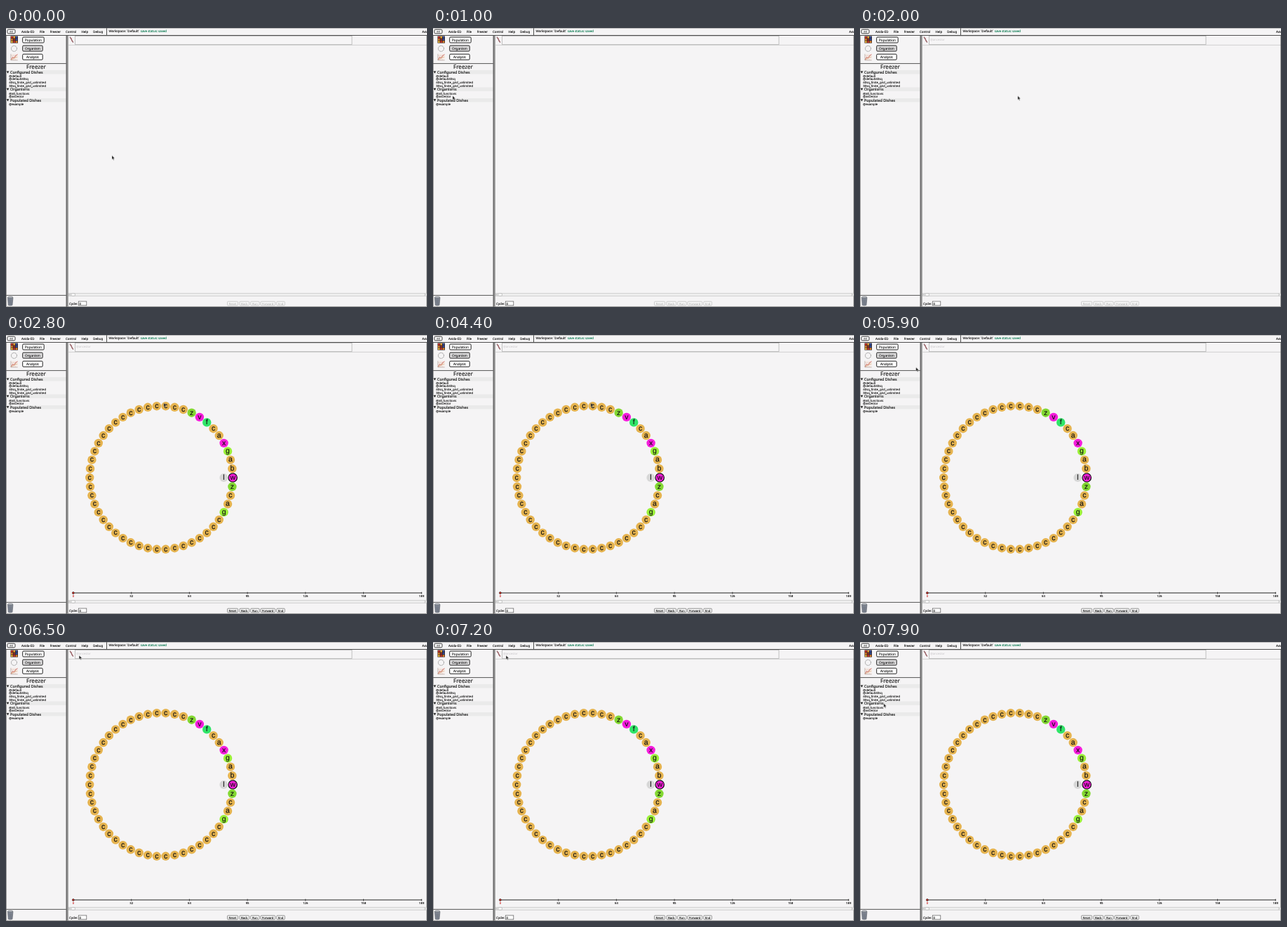
Animation, 600 px wide and 397 px high, one loop 8 s. Source, as an HTML page:

```html
<!DOCTYPE html>
<html lang="en">
<head>
<meta charset="utf-8">
<title>Organism view</title>
<style>
  html, body { margin: 0; width: 100%; height: 100%; overflow: hidden; background: #f5f4f5; }
  svg { display: block; width: 600px; height: 397px; }
  text {
    font-family: "Noto Sans", sans-serif; font-size: 4.4px; fill: #111; stroke: #111;
    stroke-width: .12px; text-rendering: geometricPrecision;
  }
  .gene { font: 10.5px "Liberation Sans", sans-serif; }
  .status { fill: #087a50; stroke: #087a50; }
  .faint { fill: #c6c4c7; stroke: none; }
  .disabled { fill: #aaa; stroke: none; }
  .current { fill: #c22; stroke: #c22; }
  #cursor { animation: travel 8s linear infinite; }
  #loaded { animation: load 8s step-end infinite; }
  #field { animation: drop 8s step-end infinite; }
  #idle { animation: unload 8s step-end infinite; }
  #picked { animation: pick 8s step-end infinite; }
  @keyframes travel {
    0%, 1.25% { transform: translate(151px, 181.5px); }
    5% { transform: translate(103px, 146px); }
    9% { transform: translate(48px, 108px); }
    11.25%, 18.75% { transform: translate(28px, 96.5px); }
    21% { transform: translate(125px, 96px); }
    23.75%, 56.25% { transform: translate(224.8px, 96.6px); }
    61% { transform: translate(136px, 91px); }
    65%, 67.5% { transform: translate(46.7px, 85.3px); }
    73% { transform: translate(76px, 50px); }
    78.75%, 90% { transform: translate(104.2px, 19px); }
    95% { transform: translate(66px, 56px); }
    98.75%, 100% { transform: translate(33.8px, 87.5px); }
  }
  @keyframes load { 0% { visibility: hidden; } 35%, 100% { visibility: visible; } }
  @keyframes unload { 0% { visibility: visible; } 35%, 100% { visibility: hidden; } }
  @keyframes drop { 0% { visibility: hidden; } 25%, 100% { visibility: visible; } }
  @keyframes pick {
    0% { fill: #111; stroke: #111; }
    65% { fill: #aaa; stroke: #aaa; }
    70%, 100% { fill: #111; stroke: #111; }
  }
</style>
</head>
<body>
<svg id="stage" viewBox="0 0 600 397"></svg>
<script>
const parts = [];
const add = markup => parts.push(markup);
const rect = (x, y, w, h, fill, extra = '') =>
  add(`<rect x="${x}" y="${y}" width="${w}" height="${h}" fill="${fill}" ${extra}/>`);
const circle = (x, y, r, fill, extra = '') =>
  add(`<circle cx="${x}" cy="${y}" r="${r}" fill="${fill}" ${extra}/>`);
const path = (d, stroke, width, fill = 'none') =>
  add(`<path d="${d}" stroke="${stroke}" stroke-width="${width}" fill="${fill}"/>`);
const text = (x, y, label, size = 4.4, extra = '') =>
  add(`<text x="${x}" y="${y}" style="font-size:${size}px" ${extra}>${label}</text>`);
const centred = 'text-anchor="middle"';
const group = (id, draw) => { add(`<g id="${id}">`); draw(); add('</g>'); };

function menuBar() {
  rect(2, 2.2, 11, 5.6, '#fff', 'rx="1.4" stroke="#222" stroke-width=".9"');
  text(7.5, 6.6, '&lt;&lt;', 4.4, centred);
  [[22, 'Avida-ED'], [48, 'File'], [62.8, 'Freezer'], [85, 'Control'],
   [107.6, 'Help'], [124.3, 'Debug'], [593, 'Avida-ED']].forEach(([x, label]) => text(x, 7, label));
  text(146.5, 6.2, 'Workspace: `Default`', 4.5);
  text(191.8, 6.2, 'save status: saved', 4.4, 'class="status"');
  path('M0 10.5H600M143.5 0V10.5', '#505050', 1);
  path('M0 .3H600', '#777', .6);
}

function modeButtons() {
  rect(6.5, 11.5, 10.5, 10, '#33231f');
  ['#c8322a', '#e9a52e', '#2f4c9c', '#e4862b', '#8e2f27', '#2f4c9c', '#e9b83a', '#c8322a', '#e4862b']
    .forEach((color, i) => rect(7.1 + i % 3 * 3.3, 12 + Math.floor(i / 3) * 3.2, 2.6, 2.5, color));
  circle(11.5, 29.3, 4, 'none', 'stroke="#666" stroke-width=".8" stroke-dasharray="1.1 .7"');
  rect(7, 36.8, 9.7, 9, '#f9f1ed');
  path('M7 39.5H16.5M7 42.5H16.5M10 37V46M13 37V46', '#dcc5ba', .5);
  path('M7.3 45.5L9.5 41.5L11.5 43L13.5 39.5L16.5 37.5', '#bd3a34', .7);
  path('M7.3 44.5L10.5 43.8L13 41.5L16.3 41', '#d99b55', .5);
  path('M7 36.8V45.8H16.7', '#8d7770', .5);
  [['Population', 13, 30.5, '#fff'], ['Organism', 25, 28.5, '#dcdbdc'], ['Analysis', 37.2, 28.5, '#fff']]
    .forEach(([label, y, w, fill]) => {
      rect(23.7, y, w, 8, fill, 'rx="1.3" stroke="#222" stroke-width="1"');
      text(23.7 + w / 2, y + 5.7, label, 4.7, centred);
    });
}

function freezer() {
  path('M0 50.6H86M0 380.4H86', '#555', 1);
  path('M.4 10.5V396.6H86', '#666', .7);
  text(43, 58.1, 'Freezer', 8, centred);
  [['Configured Dishes', 62.8], ['Organisms', 87.2], ['Populated Dishes', 102.7]].forEach(([label, y]) => {
    rect(0.8, y - 2.7, 85, 5.4, '#eaeaea');
    path(`M.7 ${y - 1.4}H4.3L2.5 ${y + 1.6}Z`, 'none', 0, '#111');
    text(6, y + 1.9, label, 5.4);
  });
  [['@default', 68.2], ['@default40sq', 72.8], ['40sq_finite_grid_unlimited', 77.5, 'id="picked"'],
   ['30sq_finite_grid_unlimited', 82.2], ['@all_functions', 93], ['@ancestor', 97.6], ['@example', 108.3]]
    .forEach(([label, y, extra]) => text(4.3, y + 1.5, label, 4.28, extra));
  path('M2.5 383.5L3.3 394.3Q6 395.5 9 394.3L10 383.5Z', '#4d525c', .6, '#838996');
  add('<ellipse cx="6.2" cy="383.4" rx="3.8" ry="1.2" fill="#b4b9bf" stroke="#4d525c" stroke-width=".6"/>');
  path('M4.6 386L5 393M6.3 386V393.5M8 386L7.6 393', '#575d69', .4);
}

function workspace() {
  rect(85.7, 10.5, 2.8, 387, '#979797');
  path('M86.2 10.5V397', '#555', 1);
  path('M88.3 10.5V397', '#777', .5);
  path('M88 24.3H600', '#b5b5b5', .6);
  path('M88 396.6H599.6V10.5', '#666', .7);
  rect(98.5, 11.5, 394.5, 12, '#f6f5f6', 'stroke="#aaa" stroke-width=".7"');
  path('M91 12.5L95.8 20.6', '#7d5a5e', 1.1);
  path('M91.2 14.2Q94.3 13.6 93.6 16.6T96 19.6', '#b0555c', .6);
  rect(89.5, 377.8, 510, 3.4, '#f0f0f0', 'stroke="#b5b5b5" stroke-width=".6"');
  path('M91.8 378.5L90.5 379.5L91.8 380.5M596.5 378.5L597.8 379.5L596.5 380.5', '#777', .5);
  rect(93, 377.6, 5.5, 3.8, '#f8f8f8', 'rx="1.5" stroke="#999" stroke-width=".5"');
  text(90, 393.6, 'Cycle:', 4.4);
  rect(103.3, 389, 11.5, 5.8, '#fff', 'stroke="#555" stroke-width=".7"');
  text(104.5, 393.5, '0', 4.4);
}

function playButtons(style, border) {
  [['Reset', 315.5, 15], ['Back', 333, 13.5], ['Run', 348.7, 12.3], ['Forward', 363, 20.5], ['End', 385.8, 11.5]]
    .forEach(([label, x, w]) => {
      rect(x, 389.2, w, 5.6, '#f8f8f8', `rx="1" stroke="${border}" stroke-width=".7"`);
      text(x + w / 2, 393.5, label, 4.2, `${centred} class="${style}"`);
    });
}

function genome() {
  const genes = 'wzcag' + 'c'.repeat(36) + 'zvfcaxgab';
  const tan = '#e5b34f', pink = '#f51cdc';
  const colors = { a: tan, b: tan, c: tan, g: '#9bf039', z: '#83d832', f: '#30e568', v: pink, x: pink, w: pink };
  const letter = (x, y, char) => add(`<text class="gene" x="${x}" y="${y}" ${centred}>${char}</text>`);
  [...genes].forEach((gene, i) => {
    const angle = i / genes.length * 2 * Math.PI;
    const x = 221.2 + 102 * Math.cos(angle), y = 203 + 102 * Math.sin(angle);
    circle(x, y, 6.2, colors[gene], i ? '' : 'stroke="#111" stroke-width="1.2"');
    letter(x, y + 2.8, gene);
  });
  circle(310.3, 203, 5.9, '#d7d7d7');
  letter(310.3, 205.9, 'l');
}

function timeline() {
  path('M95.7 367H593', '#222', 1);
  [0, 32, 63, 95, 126, 158, 189].forEach((cycle, i) => {
    const x = 96 + i * 82.7;
    path(`M${x} 365.7V368.5`, '#222', .8);
    text(x, 373.4, cycle, 4.2, `${centred} class="${i ? '' : 'current'}"`);
  });
  circle(95.8, 367, 1.5, '#c4261d', 'stroke="#222" stroke-width=".5"');
}

modeButtons();
freezer();
workspace();
menuBar();
group('field', () => text(100, 17.8, '@ancestor', 4.2, 'class="faint"'));
group('idle', () => playButtons('disabled', '#bbb'));
group('loaded', () => { genome(); timeline(); playButtons('', '#666'); });
group('cursor', () => path('M0 0V5.4L1.3 4.3L2.2 6.4L3.1 6L2.2 4H3.9Z', '#fff', .3, '#111'));
document.getElementById('stage').innerHTML = parts.join('');
</script>
</body>
</html>
```
